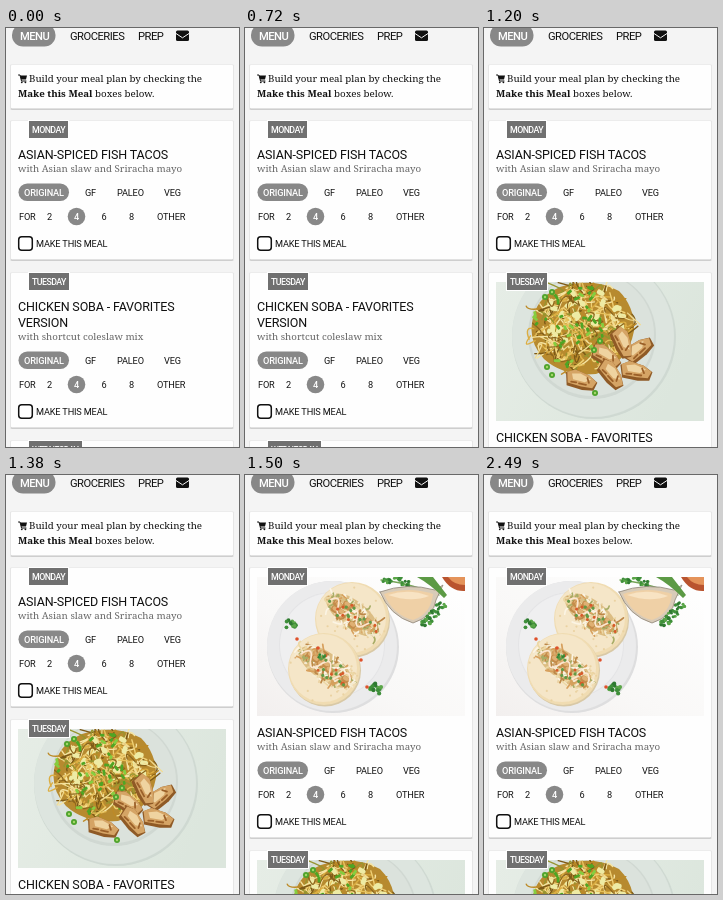
An HTML page for the animation above (3.15 s loop, 233x419 px).

```html
<!DOCTYPE html>
<html lang="en">
<head>
<meta charset="utf-8">
<title>Meal plan</title>
<style>
  html, body { margin: 0; width: 100%; height: 100%; overflow: hidden; background: #f4f4f4; }
  svg { display: block; width: 100%; height: 100%; }
  text { font-family: Roboto, sans-serif; fill: #111; white-space: pre; }
  .nav { font-size: 11.2px; letter-spacing: -.5px; }
  .title { font-size: 12.5px; letter-spacing: -.15px; }
  .label { font-size: 9.2px; letter-spacing: -.17px; }
  .tag { font-size: 8.8px; letter-spacing: -.55px; }
  .serif { font: 9.75px "Noto Serif", serif; }
  .sub { fill: #666; }
  .on { fill: #fff; font-weight: 500; }
  .bold { font-weight: 700; }
</style>
</head>
<body>
<svg id="stage" viewBox="0 0 233 419" preserveAspectRatio="none">
  <defs>
    <clipPath id="crop"><rect x="12" y="9" width="208" height="139"/></clipPath>
    <linearGradient id="table" x1="1" y1="0" x2="0" y2="1">
      <stop offset="0" stop-color="#fff"/><stop offset=".6" stop-color="#f9f8f7"/><stop offset="1" stop-color="#f2efee"/>
    </linearGradient>
    <linearGradient id="mint" x2="1" y2=".3">
      <stop offset="0" stop-color="#e6ede6"/><stop offset="1" stop-color="#dce6dd"/>
    </linearGradient>
  </defs>
</svg>
<script>
const LOOP = 3150, PHOTO = 131, GAP = 14;
const stage = document.getElementById('stage');

function add(parent, tag, attrs = {}, content) {
  const el = document.createElementNS('http://www.w3.org/2000/svg', tag);
  for (const key in attrs) el.setAttribute(key, attrs[key]);
  if (content) el.textContent = content;
  parent.append(el);
  return el;
}
const rect = (p, x, y, width, height, fill, rx = 0) => add(p, 'rect', { x, y, width, height, fill, rx });
const disc = (p, cx, cy, r, fill) => add(p, 'circle', { cx, cy, r, fill });
const path = (p, d, fill, more) => add(p, 'path', { d, fill, ...more });
const line = (p, d, stroke, width) => path(p, d, 'none', { stroke, 'stroke-width': width, 'stroke-linecap': 'round' });
const write = (p, x, y, cls, s) => add(p, 'text', { x, y, class: cls }, s);
const turned = (p, x, y, turn) => add(p, 'g', { transform: `translate(${x} ${y}) rotate(${turn})` });

function panel(p, y, h) {
  return [rect(p, 4, y - .5, 224, h + 2.5, '#e6e6e6', 1), rect(p, 5, y + 1, 222, h + .8, '#c6c6c6', 1), rect(p, 5, y, 222, h + .4, '#fefefe', 1)];
}

function random(seed) {
  return () => (seed = seed * 16807 % 2147483647) / 2147483647;
}

// Calls draw with n points spread over an ellipse
function scatter(n, seed, cx, cy, rx, ry, draw) {
  const rnd = random(seed);
  for (let i = 0; i < n; i++) {
    const a = rnd() * 6.283, r = Math.sqrt(rnd());
    draw(cx + Math.cos(a) * r * rx, cy + Math.sin(a) * r * ry, rnd, i);
  }
}

// Short curved strokes in alternating tones
function strands(p, n, seed, [cx, cy, rx, ry], reach, tones, width) {
  scatter(n, seed, cx, cy, rx, ry, (x, y, rnd, i) => {
    const step = () => (rnd() - .5) * reach;
    line(p, `M${x} ${y}q${step()} ${step()} ${step()} ${step()}`, tones[i % tones.length], width);
  });
}

function leaf(p, x, y, size) {
  const tones = ['#3f8f3a', '#5aa648', '#2f7a31'];
  scatter(13, 700 + x, x, y, 6 * size, 5 * size, (a, b, rnd, i) => disc(p, a, b, 1.9 * size, tones[i % 3]));
}

function taco(p, x, y, r, seed) {
  disc(p, x + 1, y + 1.5, r, '#d9c9a6');
  disc(p, x, y, r, '#f0dcb2');
  disc(p, x - 1, y - 1, r - 2, '#f5e6c8');
  scatter(30, seed, x, y, r - 2, r - 2, (a, b) => disc(p, a, b, 1.1, '#ead2a2'));
}

function filling(p, x, y, turn, seed) {
  const g = turned(p, x, y, turn);
  path(g, 'M-33 2Q-27 -13 -6 -14Q20 -15 31 -2Q30 11 8 13Q-22 15 -33 2Z', '#dcbd83');
  strands(g, 120, seed, [0, 0, 32, 13], 14, ['#f4ead0', '#bd8748', '#ecd7a4', '#d7a05d', '#fbf4e4', '#a9ad66'], 1.7);
  scatter(9, seed + 5, 0, 2, 26, 8, (a, b) => {
    rect(g, a - 4, b - 3, 8, 6, '#c58c4b', 2);
    rect(g, a - 3, b - 3, 6, 4, '#dfb073', 2);
  });
  line(g, 'M-28 3q6 -14 11 -1t11 -1t11 -1t11 0t11 -2', '#fbe6cf', 1.7);
  scatter(8, seed + 9, 0, 0, 29, 11, (a, b) => disc(g, a, b, 1.5, '#d75b2a'));
  scatter(10, seed + 13, 0, 0, 29, 11, (a, b) => disc(g, a, b, 1.6, '#639a46'));
}

function tacos(p) {
  rect(p, 12, 9, 208, 139, 'url(#table)');
  disc(p, 88, 79, 66, '#dededf');
  disc(p, 87, 78, 65, '#ebebec');
  disc(p, 87, 77, 53, '#e4e4e6');
  disc(p, 87, 77, 52, '#efeff0');
  taco(p, 107, 51, 37, 31);
  taco(p, 79, 101, 36, 77);
  filling(p, 108, 47, 36, 41237);
  filling(p, 81, 99, 34, 90541);
  leaf(p, 45, 57, 1);
  leaf(p, 131, 121, 1.1);
  leaf(p, 77, 89, .6);
  for (const [x, y] of [[73, 80], [122, 119], [52, 71], [116, 92]]) disc(p, x, y, 1.8, '#df512a');
  line(p, 'M136 12Q160 14 194 27', '#74a455', 1.3);
  for (const [x, y] of [[142, 13], [152, 11], [161, 16], [196, 38]]) leaf(p, x, y, .8);
  path(p, 'M135 24Q162 14 190 22L198 17L191 32Q189 48 168 55Q145 48 135 24Z', '#d8cbb8');
  path(p, 'M139 26Q164 18 188 26Q186 46 168 52Q148 47 139 26Z', '#efd0a6');
  path(p, 'M143 27Q164 20 184 28Q166 35 143 27Z', '#f8e3c3');
  line(p, 'M135 24Q162 14 190 22L198 17L191 32Q189 48 168 55Q145 48 135 24Z', '#8d8578', .8);
  path(p, 'M172 9h16l14 18l-3 3q-14-14-27-21Z', '#5c9a45');
  path(p, 'M197 9h23v14q-14 1-23-14Z', '#b9542f');
  path(p, 'M203 9h17v8q-11 0-17-8Z', '#e4935a');
  leaf(p, 181, 53, 1);
  leaf(p, 189, 46, .8);
}

function chunk(p, x, y, turn) {
  const g = turned(p, x, y, turn);
  path(g, 'M-17 -3L-9 -9L6 -8L16 -4L15 5L4 8L-12 9Z', '#8f5a26');
  path(g, 'M-16 -4L-9 -9L6 -8L15 -4L13 3L2 5L-12 6Z', '#d5a465');
  path(g, 'M-11 -4L-3 -7L9 -5L4 0L-8 1Z', '#efd3a0');
  line(g, 'M-9 4l5 -1M5 -5l3 4M-1 3l7 -1', '#9b6029', 1.8);
}

function noodles(p) {
  rect(p, 12, 9, 208, 139, 'url(#mint)');
  disc(p, 110, 64, 82, '#cfd9d2');
  disc(p, 109, 63, 81, '#dde5df');
  disc(p, 108, 62, 64, '#d0d8d2');
  disc(p, 108, 61, 62, '#dbe2dc');
  path(p, 'M48 50Q51 25 76 14Q110 4 135 18Q151 34 150 58Q144 90 112 101Q80 104 60 86Q45 70 48 50Z', '#b78a2f');
  const bowl = [98, 55, 49, 43];
  strands(p, 230, 88123, bowl, 32, ['#efcf74', '#7d5a17', '#dcae42', '#f5e4a2', '#bd8a27', '#97942f'], 1.4);
  scatter(26, 51377, 98, 42, 44, 30, (x, y, rnd) =>
    rect(turned(p, x, y, rnd() * 180), -4, -2.5, 8, 5, '#eeeba4', 2));
  strands(p, 70, 6613, bowl, 26, ['#e6c05b', '#8b651d', '#f2dc92'], 1.2);
  scatter(48, 20247, 94, 56, 46, 44, (x, y, rnd, i) =>
    rect(turned(p, x, y, rnd() * 180), -3, -1.3, 3 + rnd() * 4, 2.8, i % 3 ? '#4fa524' : '#86cd3f', 1));
  for (const [x, y, turn] of [[155, 77, -35], [138, 70, 70], [122, 84, 35], [97, 108, 20], [152, 99, 15], [127, 102, 55]]) chunk(p, x, y, turn);
  for (const [x, y] of [[61, 24], [68, 19], [116, 68], [110, 77], [63, 94], [68, 102], [111, 120]]) {
    disc(p, x, y, 3, '#4ea32b');
    disc(p, x, y, 1.2, '#a5d66a');
  }
}

function makeCard({ day, tagWidth, title, sub, height, photo }) {
  const g = add(stage, 'g');
  const base = panel(g, 0, height);
  const tall = base.map(r => +r.getAttribute('height'));
  const image = add(g, 'g', { 'clip-path': 'url(#crop)' });
  if (photo) photo(image);
  add(g, 'rect', { x: 22.5, y: -.5, width: tagWidth + 1, height: 18, fill: '#707070', stroke: '#fff' });
  write(g, 26, 12, 'tag on', day);

  const body = add(g, 'g');
  title.forEach((s, i) => write(body, 12, 38 + i * 16, 'title', s));
  const low = add(body, 'g', { transform: `translate(0 ${height - 138})` });
  write(low, 12, 51, 'serif sub', sub);
  rect(low, 12.5, 62.5, 50.5, 17.5, '#888', 8.75);
  write(low, 18, 75, 'label on', 'ORIGINAL');
  [[79, 'GF'], [111, 'PALEO'], [158, 'VEG']].forEach(([x, s]) => write(low, x, 75, 'label', s));
  disc(low, 70.5, 95.5, 8.8, '#888');
  [[13, 'FOR'], [41, '2'], [95.5, '6'], [123, '8'], [151, 'OTHER']].forEach(([x, s]) => write(low, x, 99, 'label', s));
  write(low, 68, 99, 'label on', '4');
  add(low, 'rect', { x: 12.7, y: 115.7, width: 13.6, height: 13.6, rx: 3, fill: '#fff', stroke: '#111', 'stroke-width': 1.5 });
  write(low, 30, 126, 'label', 'MAKE THIS MEAL');

  return (y, open) => {
    const shift = open ? PHOTO : 0;
    g.setAttribute('transform', `translate(0 ${y})`);
    body.setAttribute('transform', `translate(0 ${shift})`);
    image.style.display = open ? '' : 'none';
    base.forEach((r, i) => r.setAttribute('height', tall[i] + shift));
    return y + height + shift + GAP;
  };
}

rect(stage, 0, 0, 233, 419, '#f4f4f4');
rect(stage, 6, -4, 43.5, 22.5, '#888', 11);
write(stage, 14, 12, 'nav on', 'MENU');
write(stage, 64, 12, 'nav', 'GROCERIES');
write(stage, 132, 12, 'nav', 'PREP');
rect(stage, 170, 2.5, 13, 10.5, '#111', 1.5);
line(stage, 'M170 5.5L176.5 9.8L183 5.5', '#f4f4f4', 1);

panel(stage, 37, 43);
line(stage, 'M12.5 47H14L15.5 53H20', '#111', 1);
path(stage, 'M14.2 47.6H21L20 51.5H15.2Z', '#111');
disc(stage, 15.8, 54.3, .9, '#111');
disc(stage, 19.4, 54.3, .9, '#111');
write(stage, 23, 54, 'serif', 'Build your meal plan by checking the');
const note = write(stage, 12, 69, 'serif');
add(note, 'tspan', { class: 'bold' }, 'Make this Meal');
add(note, 'tspan', {}, ' boxes below.');

const cards = [
  { day: 'MONDAY', tagWidth: 39, title: ['ASIAN-SPICED FISH TACOS'], sub: 'with Asian slaw and Sriracha mayo', height: 138, photo: tacos },
  { day: 'TUESDAY', tagWidth: 40, title: ['CHICKEN SOBA - FAVORITES', 'VERSION'], sub: 'with shortcut coleslaw mix', height: 154, photo: noodles },
  { day: 'WEDNESDAY', tagWidth: 53, title: ['VEGETABLE SOUP'], sub: 'with toasted bread', height: 138 }
].map(makeCard);

function update(t) {
  const open = [t >= 1500, t >= 1200, false];
  cards.reduce((y, place, i) => place(y, open[i]), 93);
}

const start = performance.now();
function tick() {
  update((performance.now() - start) % LOOP);
  requestAnimationFrame(tick);
}
tick();
</script>
</body>
</html>
```
